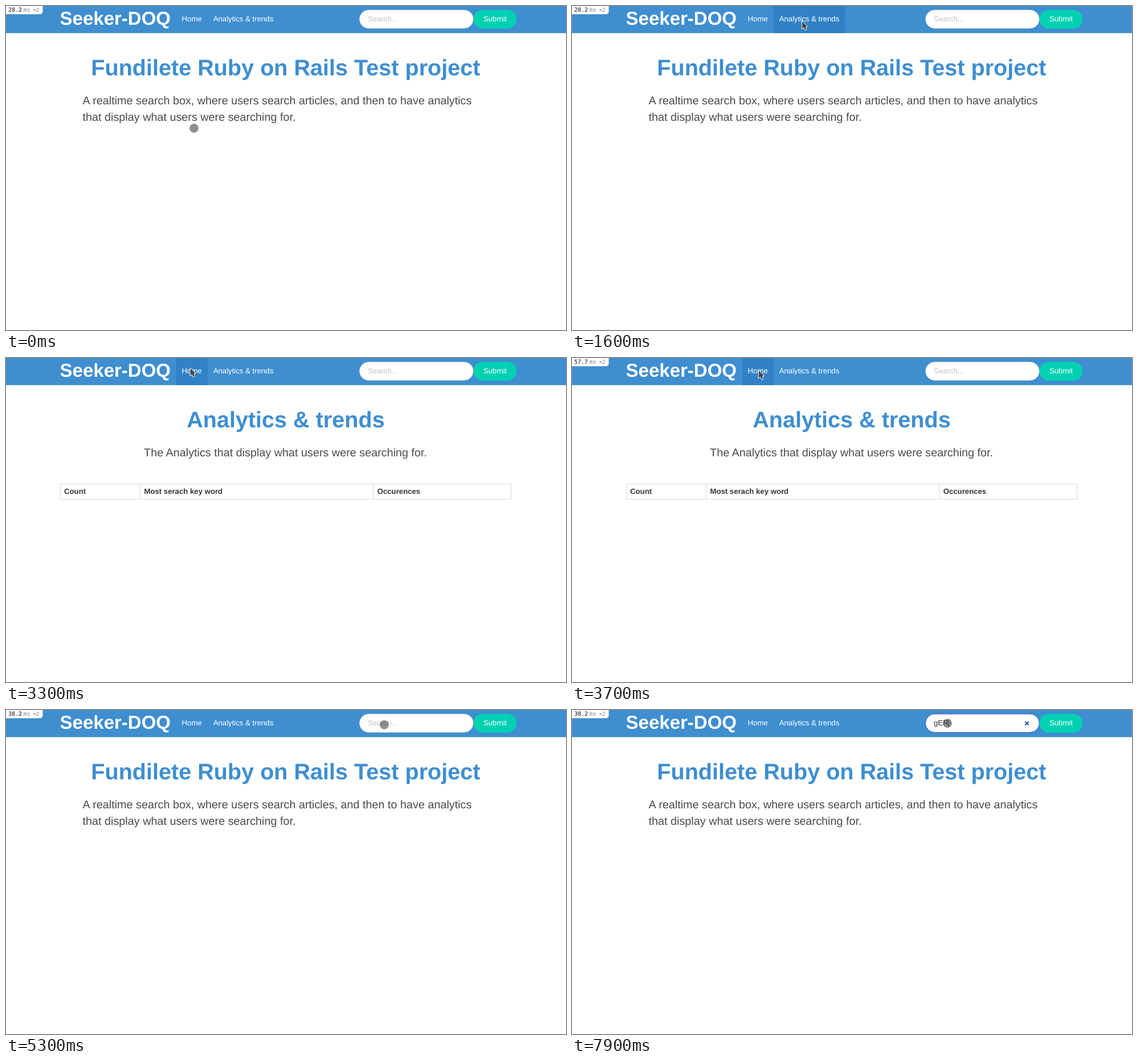
An HTML page for the animation above (8 s loop, 983x570 px).

```html
<!DOCTYPE html>
<html lang="en">
<head>
<meta charset="utf-8">
<title>Search demo</title>
<style>
  html, body { margin: 0; width: 100%; height: 100%; overflow: hidden; background: #fff; }
  svg { display: block; font: 13.2px "Liberation Sans", Arial, sans-serif; text-rendering: geometricPrecision; }
  .bar { fill: #3e8ed0; }
  .hover { fill: #3082c5; }
  .light { fill: #fff; }
  .brand { font-size: 33px; font-weight: bold; }
  .title { font-size: 39.6px; font-weight: bold; fill: #3e8ed0; text-anchor: middle; }
  .lead { font-size: 19.8px; fill: #4a4a4a; }
  .head { font-weight: bold; fill: #363636; }
  .mid { text-anchor: middle; }
  .grid { fill: none; stroke: #dbdbdb; }
  .badge { font: 10px "DejaVu Sans Mono", monospace; }
</style>
</head>
<body>
<svg width="983" height="570" viewBox="0 0 983 570">
  <rect class="bar" width="983" height="47.7"/>
  <rect id="hover" class="hover" height="47.7"/>
  <g class="light">
    <text class="brand" x="94.6" y="33.4">Seeker-DOQ</text>
    <text x="308.6" y="26.6">Home</text>
    <text x="363.7" y="26.6">Analytics &amp; trends</text>
  </g>

  <rect id="glow" x="618.8" y="5" width="203.4" height="36.2" rx="18.1" fill="#485fc7" opacity=".25"/>
  <rect x="820.6" y="6.7" width="75.8" height="33" rx="16.5" fill="#00d1b2"/>
  <text class="light mid" x="858.5" y="26.6">Submit</text>
  <rect id="field" x="620.6" y="7.1" width="199.6" height="32.2" rx="16.1" fill="#fff" stroke-width=".9"/>
  <text id="query" x="635" y="26.6"></text>
  <path id="clear" d="M795.3 20.3l6.4 6.4m0-6.4l-6.4 6.4" stroke="#2b5caa" stroke-width="2.2"/>
  <rect id="caret" y="16.2" width="1" height="14" fill="#363636"/>

  <g id="home">
    <text class="title" x="490.9" y="122">Fundilete Ruby on Rails Test project</text>
    <text class="lead" x="134.6" y="172.6">A realtime search box, where users search articles, and then to have analytics</text>
    <text class="lead" x="134.6" y="202.3">that display what users were searching for.</text>
  </g>

  <g id="trends">
    <text class="title" x="490.9" y="122">Analytics &amp; trends</text>
    <text class="lead mid" x="490.6" y="172.6">The Analytics that display what users were searching for.</text>
    <path class="grid" d="M95.5 221.5H886.5V248.5H95.5ZM235.5 221.5V248.5M644.5 221.5V248.5"/>
    <g class="head">
      <text x="102" y="238.6">Count</text>
      <text x="242.4" y="238.6">Most serach key word</text>
      <text x="651.7" y="238.6">Occurences</text>
    </g>
  </g>

  <g id="badge" class="badge">
    <path d="M-1-1H64.5V9.5a5 5 0 0 1-5 5H-1Z" fill="#fff" stroke="#bbb" stroke-width=".8"/>
    <text id="ms" x="4" y="10" fill="#111"></text>
    <text x="30.4" y="10" fill="#888">ms</text>
    <text x="47.6" y="10" fill="#777" font-size="9">×2</text>
  </g>

  <circle id="dot" r="7.9" fill="#444" opacity=".6"/>
  <path id="arrow" d="M0 0V14.6L3.4 12.2L5.6 16.8L8.6 15.4L7 10.8L10 9.8Z" fill="#444" stroke="#fff" stroke-width="1"/>
</svg>
<script>
const LOOP = 8000;
const parts = {};
document.querySelectorAll("svg [id]").forEach(el => parts[el.id] = el);

const show = (el, on) => el.setAttribute("visibility", on ? "visible" : "hidden");
const set = (el, attrs) => { for (const k in attrs) el.setAttribute(k, attrs[k]); };
const within = (t, from, to) => t >= from && t < to;
// Value of the last entry whose time has passed.
const latest = (steps, t) => steps.filter(s => s[0] <= t).pop().slice(1);

const stops = [
  [0, 330, 215], [1200, 403, 17], [1600, 403.3, 26], [2600, 353.8, 25.4],
  [2800, 319, 13], [3300, 323, 17], [3400, 327.2, 21.3], [4400, 700.7, 41.5],
  [4500, 703, 38.8], [4800, 680, 31], [4900, 664, 27], [5200, 664, 26], [5500, 659, 23.3]
];
const badges = [[0, "28.2"], [2400, ""], [3700, "57.7"], [4400, ""], [5100, "38.2"]];
const typed = [[0, ""], [6900, "g"], [7700, "gE"], [7900, "gER"]];
const advance = { g: 7.34, E: 8.8, R: 9.53 };

function pointer(t) {
  if (!within(t, 500, 1200)) return latest(stops, t);
  const u = (Math.floor((t - 500) / 100) + 1) / 8, v = 1 - u;
  const bend = (a, b, c) => a * v * v + 2 * b * u * v + c * u * u;
  return [bend(330, 290, 403), bend(215, 110, 17)];
}

function render(t) {
  const onTrends = within(t, 2400, 4400);
  show(parts.home, !onTrends);
  show(parts.trends, onTrends);

  const overTrends = within(t, 1600, 2400), overHome = within(t, 3300, 4400);
  show(parts.hover, overTrends || overHome);
  set(parts.hover, overTrends ? { x: 353.8, width: 125.4 } : { x: 298.8, width: 55 });

  const [ms] = latest(badges, t);
  show(parts.badge, ms);
  parts.ms.textContent = ms;

  const focused = t >= 5500;
  const [word] = latest(typed, t);
  show(parts.glow, focused);
  set(parts.field, { stroke: focused ? "#485fc7" : "#dbdbdb" });
  parts.query.textContent = word || "Search...";
  set(parts.query, { fill: word ? "#363636" : "#c3c3c3" });
  show(parts.clear, word);
  show(parts.caret, focused && !within(t, 5900, 6500) && !within(t, 7400, 7700));
  set(parts.caret, { x: [...word].reduce((x, c) => x + advance[c], 635) });

  const [x, y] = pointer(t);
  const overText = t < 1200 ? y > 150 || within(y, 87, 131) : t >= 4500;
  show(parts.dot, overText);
  show(parts.arrow, !overText);
  set(overText ? parts.dot : parts.arrow, { transform: `translate(${x} ${y})` });
}

const start = performance.now();
function tick() {
  render((performance.now() - start) % LOOP);
  requestAnimationFrame(tick);
}
tick();
</script>
</body>
</html>
```
